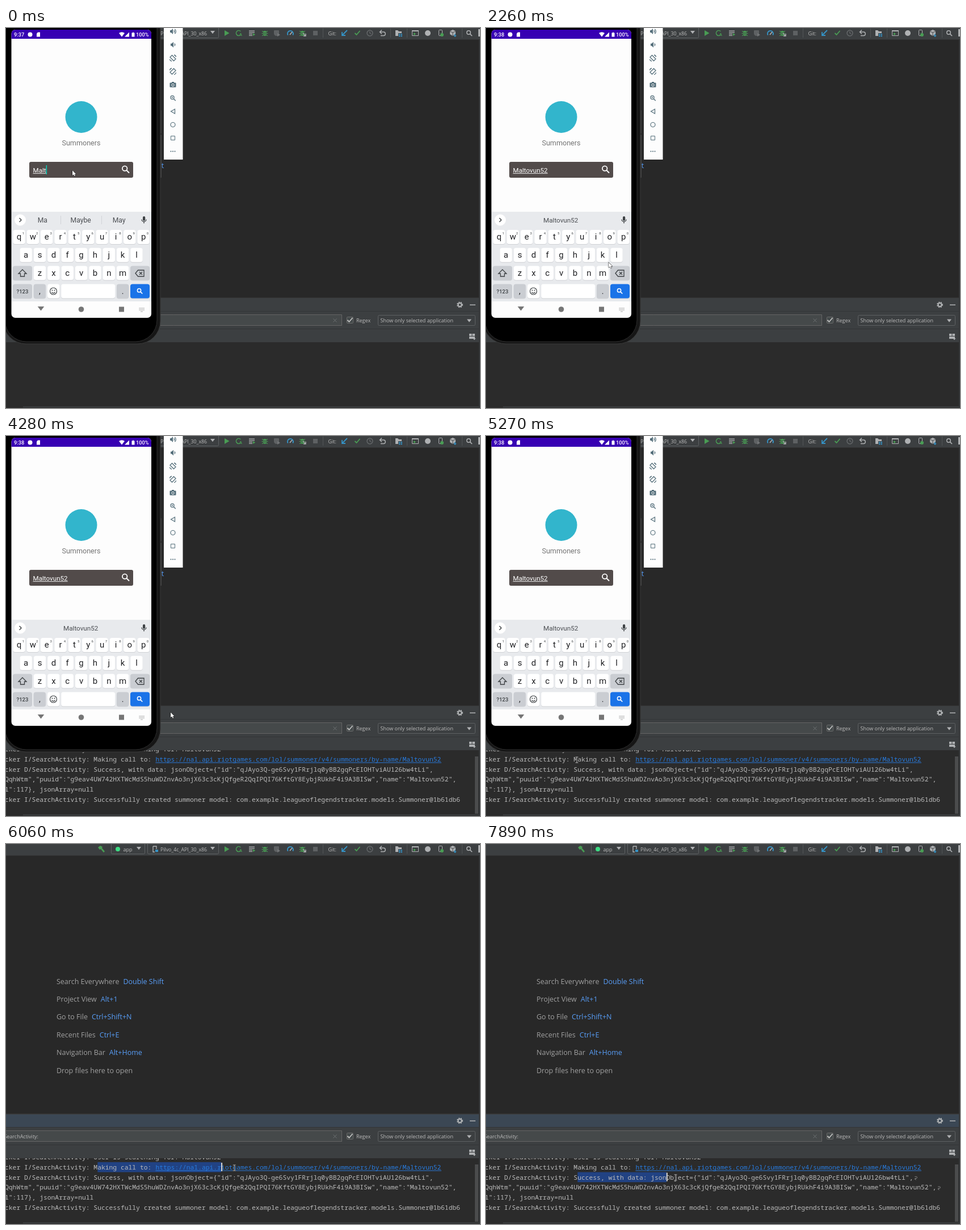
Write an HTML page with a canvas that moves like this. It is 835 by 670 pixels and loops after 8 s.

```html
<!DOCTYPE html>
<html lang="en">
<head>
<meta charset="utf-8">
<title>Summoner search</title>
<style>
html, body { margin: 0; width: 100%; height: 100%; overflow: hidden; background: #282828; }
canvas { display: block; width: 835px; height: 670px; }
</style>
</head>
<body>
<canvas id="c" width="835" height="670"></canvas>
<script>
const g = document.getElementById('c').getContext('2d');
const LOOP = 8000, CLOSE = 5670, LOG = 3470;
const NAME = 'Maltovun52';
const UI = 'px "Open Sans", "Noto Sans", sans-serif';
const ROBO = 'px Roboto, sans-serif';
const MONO = '11.33px "Noto Sans Mono", "DejaVu Sans Mono", monospace';
const BAR = '#3c3f41', GREY = '#afb1b3', DIM = '#5e6163', LABEL = '#bbbbbb';
const GREEN = '#499c54', BLUE = '#3592c4', SLATE = '#546e7a', INK = '#3c4043', WHITE = '#ffffff';

// ---- drawing helpers
function rect(x, y, w, h, fill) { g.fillStyle = fill; g.fillRect(x, y, w, h); }
function round(x, y, w, h, r, fill, line) {
  g.beginPath();
  g.roundRect(x, y, w, h, r);
  if (fill) { g.fillStyle = fill; g.fill(); }
  if (line) { g.strokeStyle = line; g.lineWidth = 1; g.stroke(); }
}
function disc(x, y, r, fill) {
  g.beginPath(); g.arc(x, y, r, 0, 7);
  g.fillStyle = fill; g.fill();
}
function ring(x, y, r, color, w = 1.2, from = 0, to = 7) {
  g.beginPath(); g.arc(x, y, r, from, to);
  g.strokeStyle = color; g.lineWidth = w; g.stroke();
}
function text(s, x, y, font, color, align = 'left') {
  g.font = font; g.fillStyle = color; g.textAlign = align;
  g.fillText(s, x, y);
}
function fillPath(d, x, y, color) {
  g.save(); g.translate(x, y);
  g.fillStyle = color; g.fill(new Path2D(d));
  g.restore();
}
function linePath(d, x, y, color, w = 1.3, flip = 1) {
  g.save(); g.translate(x, y); g.scale(flip, 1);
  g.strokeStyle = color; g.lineWidth = w; g.stroke(new Path2D(d));
  g.restore();
}
const right = (x, y, s, color) => fillPath(`M0 ${-s}L${s * 1.7} 0L0 ${s}Z`, x, y, color);
const down = (x, y, s, color) => fillPath(`M${-s} 0H${s}L0 ${s * 1.3}Z`, x, y, color);
const cross = (x, y, s, color, w) => linePath(`M${-s} ${-s}L${s} ${s}M${s} ${-s}L${-s} ${s}`, x, y, color, w);
const check = (x, y, color) => linePath('M-4.5 0L-1.5 3L4.5 -4', x, y, color, 1.8);
function lens(x, y, s, color, w) {
  ring(x - s * .2, y - s * .2, s * .65, color, w);
  linePath(`M${s * .25} ${s * .25}L${s} ${s}`, x, y, color, w * 1.15);
}

// ---- motion
const path = [
  [0, 117, 251], [2040, 117, 251], [2260, 216, 413], [2530, 246, 518], [2650, 246, 480],
  [2900, 245, 460], [4200, 245, 460], [4520, 423, 568], [4640, 372, 576], [5000, 164, 573],
  [5120, 160, 571], [5550, 160, 571], [CLOSE, 177, 571], [5910, 301, 571], [6660, 804, 571],
  [6780, 782, 574], [6900, 375, 588], [7380, 162, 588], [7480, 162, 588], [7890, 334, 588]
];
function mouse(t) {
  const i = path.findIndex(p => p[0] > t);
  if (i < 0) return path.at(-1).slice(1);
  const [t0, x0, y0] = path[i - 1], [t1, x1, y1] = path[i];
  const k = (t - t0) / (t1 - t0);
  return [x0 + (x1 - x0) * k, y0 + (y1 - y0) * k];
}
function typedCount(t) {
  if (t < 1040) return t < 780 ? 4 : 5;
  return Math.min(10, 6 + Math.floor((t - 1040) / 128));
}
function hints(t) {
  if (t < 120) return ['Ma', 'Maybe', 'May'];
  if (t < 1040) return ['Malt', t < 240 ? 'Maybe' : 'Malted', 'Malts'];
  return [t < 1740 ? NAME.slice(0, typedCount(t) - 2) : '', NAME, ''];
}
const caretOn = t => t < 1606 || Math.floor((t - 1606) / 523) % 2 === 0;

// ---- log
const COL = 6.805, LEFT = -2, ROW = 17.65, ANCHOR = 24, LAST = 112;
const colX = n => LEFT + n * COL;
const rowY = n => 556.3 + n * ROW;
const ADDRESS = 'https://na1.api.riotgames.com/lol/summoner/v4/summoners/by-name/' + NAME;
const log = [
  'cker I/SearchActivity: User is searching for: ' + NAME,
  'cker I/SearchActivity: Making call to: ',
  'cker D/SearchActivity: Success, with data: jsonObject={"id":"qJAyo3Q-ge6Svy1FRrjlq0yBB2gqPcEIOHTviAU126bw4tLi",',
  'QqhWtm","puuid":"g9eav4UW742HXTWcMdS5huWDZnvAo3njX63c3cKjQfgeR2QqIPQI76KftGY8EybjRUkhF4i9A3BISw","name":"' + NAME + '",',
  'l":117}, jsonArray=null',
  'cker I/SearchActivity: Successfully created summoner model: com.example.leagueoflegendstracker.models.Summoner@1b61db6'
];

function drawLog(t) {
  g.save();
  g.beginPath(); g.rect(0, 554, 833, 112); g.clip();

  // the selection trails the pointer and stays once the drag ends
  const second = t >= 7480;
  const [x] = mouse(second ? t - 30 : Math.min(t - 30, 6660));
  const end = t < 5600 ? 0 : Math.min(LAST, Math.floor((x - LEFT) / COL));
  const top = rowY(second ? 2 : 1) - 13;
  const marked = end > ANCHOR;
  if (marked) rect(colX(ANCHOR), top, (end - ANCHOR) * COL, ROW, '#214283');

  log.forEach((s, i) => text(s, LEFT, rowY(i), MONO, LABEL));
  const link = colX(log[1].length);
  text(ADDRESS, link, rowY(1), MONO, '#287bde');
  rect(link, rowY(1) + 1.5, ADDRESS.length * COL, 1, '#287bde');

  if (end === LAST) {
    rect(colX(LAST), top + 1, COL, 15, '#dddddd');
    text(NAME.slice(-1), colX(LAST), rowY(1), MONO, '#2b2b2b');
  } else if (marked) rect(colX(end), top + 1, 2, 15, '#d8d8d8');
  if (second) for (const i of [2, 3])
    linePath('M-2 -2Q3 -3 2 0Q1 2 -2 2M0 0L-2 2L0 4', colX(log[i].length) + 4, rowY(i) - 3, '#9a9a9a', .8);
  rect(826, 565, 6, 101, '#4b4c4d');
  g.restore();
}

// ---- IDE
function combo(x, y, w, h) {
  round(x + .5, y + .5, w, h, 2, BAR, DIM);
  down(x + w - 10, y + h / 2 - 1.5, 4, GREY);
}
function bug(x) {
  g.beginPath(); g.ellipse(x, 9.5, 3.2, 4.4, 0, 0, 7);
  g.fillStyle = GREEN; g.fill();
  for (const s of [-1, 1]) linePath('M0 -2L5 -4M0 0H5.5M0 2L5 4', x, 9.5, GREEN, 1.1, s);
  for (const d of [-1, 1.5]) rect(x - 3, 9 + d, 6, .8, BAR);
}

function drawToolbar() {
  const y = 9;
  rect(0, 0, 835, 20, BAR);
  rect(0, 20, 835, 1, '#323232');
  fillPath('M-6 -3L-2 -6L2 -4L1 -2L6 4L4 6L-1 0L-3 1Z', 168, y, GREEN);
  combo(185, -4, 59, 21);
  disc(197, y, 4, '#3ddc84');
  text('app', 206.5, 12.5, 9 + UI, LABEL);
  combo(249, -4, 125, 21);
  linePath('M-3 -5H3V0M-3 -5V5H0', 262, y, GREY);
  rect(263, 10, 5, 4, BLUE);
  text('Pilvo_4c_API_30_x86', 272, 12.5, 8.75 + UI, LABEL);

  right(385, y, 5, GREEN);
  ring(410, y, 4.5, GREEN, 1.6, .8, 5.5);
  text('A', 411, 14, 'bold ' + 7 + UI, GREEN);
  for (let i = 0; i < 4; i++) rect(428, 4.5 + i * 2.7, i < 2 ? 10 : 6, 1.3, GREY);
  right(435, 11.5, 2.5, GREEN);
  bug(456);
  round(472, 4, 9, 10, [1, 1, 5, 5], DIM);
  right(478, 12, 3, '#737577');
  ring(501, 10, 5, BLUE, 2, 2.6, 6.8);
  linePath('M-1 2L3 -3', 501, 10, GREY, 1.6);
  bug(522);
  linePath('M0 0L5 5M5 1V5H1', 523, y, GREY, 1.4);
  rect(541, 5, 8, 8, DIM);
  for (const x of [558, 677, 706, 803]) rect(x, 1, 1, 16, '#515456');

  text('Git:', 567.5, 12.5, 9 + UI, LABEL);
  linePath('M5 -5L-4 4M-4 -2V4H2', 596, y, BLUE, 1.8);
  check(619, y, GREEN);
  ring(641, y, 5, '#66696b', 1.4);
  linePath('M0 -3V0L2.5 1.5', 641, y, '#66696b');
  linePath('M-4 -2H2A3.2 3.2 0 0 1 2 4.5H-3M-1 -5.5L-4.5 -2L-1 1.5', 663, y, GREY, 1.5);
  fillPath('M-6 -5H-2L0 -3H5V0H-1V5H-6Z', 692, y, GREY);
  for (let i = 0; i < 4; i++) rect(692 + i % 2 * 3.5, 10 + (i >> 1) * 3, 2.4, 2.2, BLUE);
  round(715.5, 4.5, 11, 9, 0, null, GREY);
  rect(715, 4, 12, 2, GREY);
  right(718, 10.5, 2.5, GREEN);
  disc(743, y, 5, GREY);
  round(762.5, 3.5, 6, 10, 1, null, GREY);
  disc(768, 12, 3, GREEN);
  fillPath('M0 -6L5 -3.5V2L0 5L-5 2V-3.5Z', 787, y, GREY);
  linePath('M-5 -3L0 -1L5 -3M0 -1V5', 787, y, BAR, .9);
  linePath('M3 1V6M1 4L3 6L5 4', 788, y, BLUE);
  lens(816, y, 5, GREY, 1.5);
  rect(832, 2, 3, 13, GREY);
}

function drawTips() {
  const tips = ['Search Everywhere|Double Shift', 'Project View|Alt+1', 'Go to File|Ctrl+Shift+N',
    'Recent Files|Ctrl+E', 'Navigation Bar|Alt+Home', 'Drop files here to open|'];
  tips.forEach((tip, i) => {
    const [label, keys] = tip.split('|'), y = 246.6 + i * 31.4;
    text(label, 89, y, 12.5 + UI, '#a0a0a0');
    text(keys, 96 + g.measureText(label).width, y, 12.5 + UI, '#589df6');
  });
}

function drawToolWindow(t) {
  rect(0, 476, 835, 78, BAR);
  rect(0, 475, 835, 1, '#323232');
  if (t > CLOSE + 60) rect(0, 477, 833, 22, '#3b4754');
  for (const y of [499, 530]) rect(0, y, 835, 1, '#333537');
  g.setLineDash([2, 1.6]);
  ring(799.5, 488, 4.4, GREY, 2);
  g.setLineDash([]);
  ring(799.5, 488, 3, GREY, 2);
  rect(817, 487.5, 10, 1.5, GREY);
  round(-5.5, 505.5, 597, 19, 0, '#45494a', '#646464');
  text('SearchActivity:', 57, 519, 9 + UI, LABEL, 'right');
  cross(579.5, 515.5, 3, '#6e7173', 1);
  round(600.5, 509.5, 11, 11, 1, '#43494a', '#6b6b6b');
  check(606, 515, '#c0c0c0');
  text('Regex', 617, 519, 9 + UI, LABEL);
  combo(655, 506, 171, 18);
  text('Show only selected application', 659.5, 519, 9 + UI, LABEL);
  for (const x of [816, 821.5]) rect(x, 539, 4.5, 4, GREY);
  rect(816, 544, 10, 4, GREY);
  down(825, 547, 2.5, GREY);

  rect(0, 554, 835, 116, '#2b2b2b');
  if (t >= LOG) drawLog(t);
  rect(30, 667, 805, 2, '#3b3d3e');
}

function drawIde(t) {
  rect(0, 0, 835, 670, '#282828');
  drawToolbar();
  drawTips();
  drawToolWindow(t);
  rect(833, 21, 2, 649, '#333537');
}

// ---- emulator
const MOD = '#cacdd2', PITCH = 24.35;
const keyTop = row => 356 + row * 31.8;
function key(cx, row, w = 21.4, fill = WHITE) {
  const y = keyTop(row);
  round(cx - w / 2, y + 1, w, 25, 4, '#cfd1d5');
  round(cx - w / 2, y, w, 25, 4, fill);
}
function keyRow(letters, x, row) {
  [...letters].forEach((c, i) => {
    const cx = x + i * PITCH;
    key(cx, row);
    text(c, cx, keyTop(row) + 17.2, 15 + ROBO, '#202124', 'center');
    if (!row) text((i + 1) % 10, cx + 7.4, 363.5, 6 + ROBO, INK, 'center');
  });
}

function drawKeyboard(t) {
  rect(10, 324, 246, 158, '#e8eaed');
  disc(25, 338.5, 10, WHITE);
  linePath('M-1.5 -3.5L2 0L-1.5 3.5', 25, 338.5, INK, 1.4);
  hints(t).forEach((s, i) => text(s, 64.3 + i * 67.4, 342.7, (s === NAME ? 11.7 : 12.2) + ROBO, '#4a4d51', 'center'));
  if (t < 1740) for (const x of [96, 168]) rect(x, 331, 1, 15, '#d2d4d8');
  round(241, 332, 4.2, 8, 2.1, INK);
  linePath('M-4 -1A4 4 0 0 0 4 -1M0 3V6', 243, 338.5, INK);

  ['qwertyuiop', 'asdfghjkl', 'zxcvbnm'].forEach((s, i) => keyRow(s, 23 + i * PITCH * (i + 1) / 4, i));
  key(29, 2, 34, MOD);
  linePath('M0 -6L7 1H3.5V6H-3.5V1H-7Z', 29, 432, INK);
  key(236, 2, 34, MOD);
  linePath('M-8 0L-3.5 -5.5H7V5.5H-3.5Z', 236, 432.5, INK);
  cross(237.5, 432.5, 2.5, INK);
  key(29, 3, 34, MOD);
  text('?123', 29, 467.5, '500 ' + 9.5 + ROBO, INK, 'center');
  for (const [c, x] of [[',', 59.4], ['.', 205.6]]) {
    key(x, 3, 21.4, MOD);
    text(c, x, 469, 14 + ROBO, '#202124', 'center');
  }
  key(83.7, 3);
  ring(83.5, 464, 6, INK);
  for (const d of [-2, 2]) disc(83.5 + d, 462.5, 1, INK);
  ring(83.5, 464.5, 3, INK, 1.2, .3, 2.8);
  key(144.7, 3, 95);
  key(236, 3, 34, '#1a73e8');
  lens(235.5, 463.7, 4.8, WHITE, 1.5);
}

function drawStatus(t) {
  const font = '500 ' + 9.2 + ROBO;
  rect(9, 3, 248, 16, '#3700b3');
  text(t < 640 ? '9:37' : '9:38', 14, 15, font, WHITE);
  disc(42.5, 11.5, 4, WHITE);
  fillPath('M-3 -1.5L-1 -4H3V4H-3Z', 57, 11.5, WHITE);
  fillPath('M-5 -2.5Q0 -6 5 -2.5L0 4Z', 204, 11.5, WHITE);
  fillPath('M4 -4V4H-4Z', 213, 11.5, WHITE);
  rect(221.5, 8.5, 5, 7, WHITE);
  rect(223, 7.5, 2, 1, WHITE);
  text('100%', 229, 15, font, WHITE);
}

function drawSearch(t) {
  round(41, 236, 183, 28, 3, '#524b4a');
  const s = NAME.slice(0, typedCount(t));
  text(s, 47.5, 254.7, 11.65 + ROBO, WHITE);
  const w = g.measureText(s).width;
  rect(47.5, 256, w, 1, '#e8e8e8');
  if (caretOn(t)) rect(47.5 + w, 242, 1.4, 16, '#03dac5');
  lens(210.5, 249, 6.5, WHITE, 1.8);
}

function drawPhone(t) {
  round(271, 145, 3, 41, 1, '#3a3a3a');
  round(271, 188, 3, 76, 1, '#454545');
  round(-5, -40, 277, 597, 40, '#161616', '#3b3b3b');
  round(-2, -40, 268, 593, 38, '#000000', '#2d2d2d');
  g.save();
  g.beginPath(); g.roundRect(9.5, 3, 246.5, 508, 7); g.clip();
  rect(9, 3, 248, 509, '#fdfdfd');
  drawStatus(t);
  disc(132.5, 157, 28, '#32b5cc');
  text('Summoners', 132.5, 207.3, 12.6 + ROBO, '#757575', 'center');
  drawSearch(t);
  drawKeyboard(t);
  down(61.5, 491, 5.8, '#757575');
  disc(132.5, 496, 4.8, '#757575');
  rect(199, 491.5, 9, 9, '#757575');
  for (let i = 0; i < 15; i++) rect(234.5 + i % 5 * 2, 493 + (i / 5 | 0) * 2, 1.2, 1.2, '#aaaaaa');
  rect(237, 499.5, 4, 1, '#aaaaaa');
  g.restore();
}

function speaker(x, y, waves) {
  fillPath('M-5 -2H-3L0 -5V5L-3 2H-5Z', x, y, SLATE);
  for (let i = 1; i <= waves; i++) ring(x, y, i * 2.6, SLATE, 1.3, -.9, .9);
}
function turn(x, y, flip) {
  linePath('M-5 -1.5L-1.5 -5L5 1.5L1.5 5ZM-5.5 2Q-5 5 -2 5.5M2 -5.5Q5 -5 5.5 -2', x, y, SLATE, 1.3, flip);
}
const panel = [
  (x, y) => speaker(x, y, 2),
  (x, y) => speaker(x + 1, y, 1),
  (x, y) => turn(x, y, 1),
  (x, y) => turn(x, y, -1),
  (x, y) => {
    round(x - 5.5, y - 3.5, 11, 8, 1, SLATE);
    rect(x - 2, y - 5, 4, 2, SLATE);
    ring(x, y + .5, 2.2, '#fdfdfd', 1);
  },
  (x, y) => {
    lens(x, y, 4.8, SLATE, 1.2);
    linePath('M-2.6 -1H.8M-.9 -2.7V.7', x, y, SLATE, .8);
  },
  (x, y) => linePath('M3.5 -4V4L-3.5 0Z', x, y, SLATE, 1.2),
  (x, y) => ring(x, y, 4, SLATE),
  (x, y) => round(x - 3.5, y - 3.5, 7, 7, 0, null, SLATE),
  (x, y) => { for (const d of [-3.5, 0, 3.5]) disc(x + d, y, 1.1, SLATE); }
];
function drawPanel() {
  rect(278, 0, 33.5, 232, '#fdfdfd');
  panel.forEach((icon, i) => icon(294, 6 + i * 23.5));
}

function drawMouse(t) {
  const [x, y] = mouse(t);
  if (t < 4500) {
    const d = 'M0 0V9L2.2 7.2L3.8 10.3L5.2 9.6L3.8 6.7H6.5Z';
    linePath(d, x, y, '#000000', 1);
    fillPath(d, x, y, WHITE);
  } else {
    const d = 'M-2.5 -5H2.5M0 -5V5M-2.5 5H2.5';
    linePath(d, x, y, '#1c1c1c', 2);
    linePath(d, x, y, '#d0d0d0', .9);
  }
}

const start = performance.now();
function tick() {
  const t = Math.max(0, performance.now() - start) % LOOP;
  drawIde(t);
  if (t < CLOSE) { drawPhone(t); drawPanel(); }
  drawMouse(t);
  requestAnimationFrame(tick);
}
tick();
</script>
</body>
</html>
```
